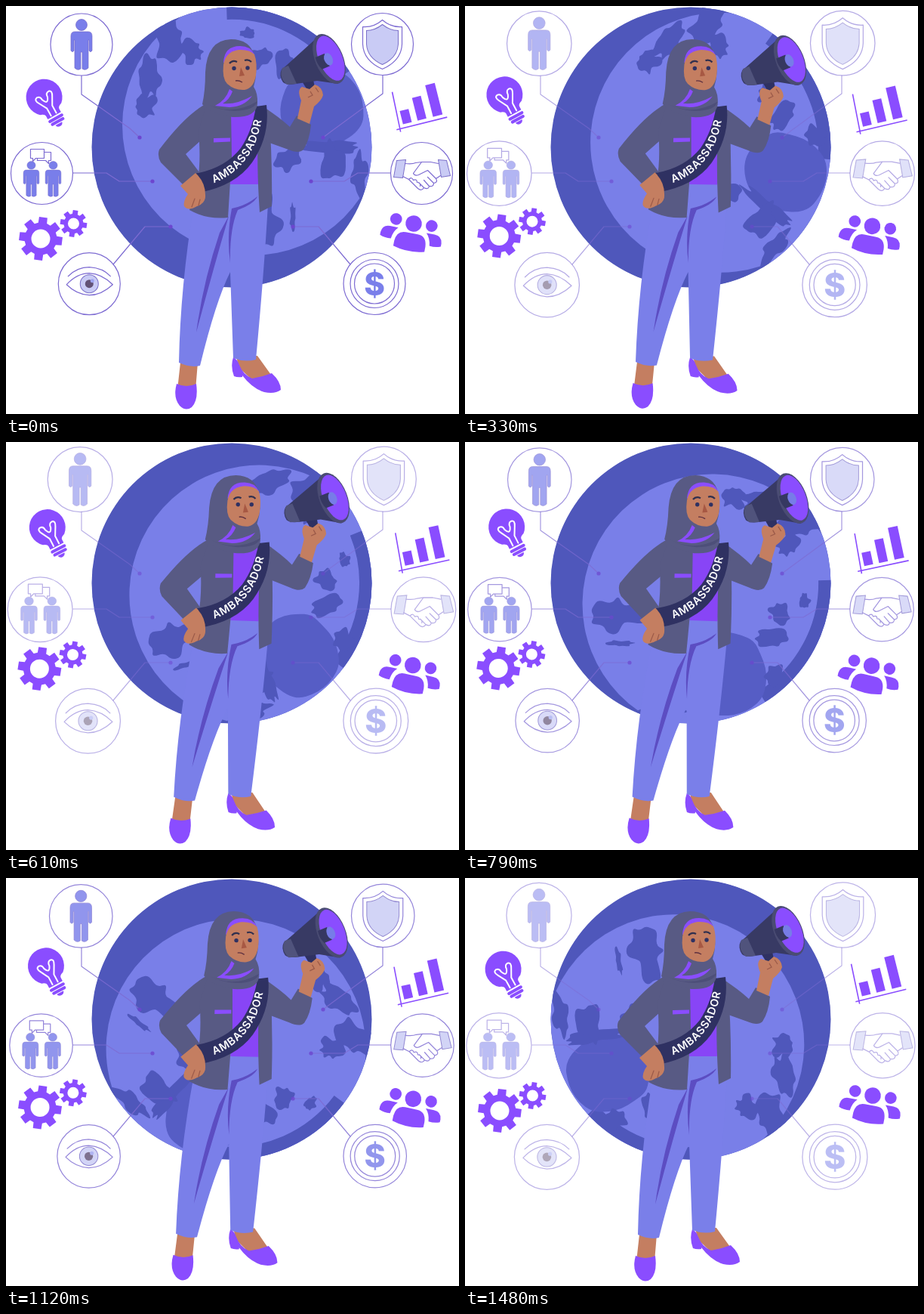
Recreate the animation shown at these times as an HTML page. Size 600x540 px, loop 1510 ms.

```html
<!DOCTYPE html>
<html lang="en">
<head>
<meta charset="utf-8">
<title>Ambassador</title>
<style>
html, body { margin: 0; width: 100%; height: 100%; overflow: hidden; background: #fff; }
svg { display: block; width: 600px; height: 540px; }
.v { fill: #8a4dff; }
.slate { fill: #585a84; }
.navy { fill: #2f3162; }
.skin { fill: #c47e61; }
.ln { fill: none; stroke: #7d6bd2; stroke-width: 1.2; stroke-linejoin: round; stroke-linecap: round; }
.w { fill: none; stroke: #fff; stroke-width: 2; stroke-linecap: round; stroke-linejoin: round; }
.fig { fill: #797eea; stroke: #7468cb; stroke-width: .7; }
.pale { fill: #c9cbf5; stroke: #7b70c9; stroke-width: 1; }
</style>
</head>
<body>
<svg viewBox="0 0 600 540" xmlns="http://www.w3.org/2000/svg">
<defs>
  <clipPath id="ball"><circle cx="299" cy="187" r="185.5"/></clipPath>
  <path id="arc" d="M275 234.500Q332 212 340 141"/>
  <g id="man">
    <circle cy="-26" r="7.500"/>
    <path d="M-9-17H9Q14-17 14-11V8Q12 11 10 8V-6H9V31Q5 35 1 32V10H-1V32Q-5 35-9 31V-6H-10V8Q-12 11-14 8V-11Q-14-17-9-17Z"/>
  </g>
  <g id="side">
    <circle cx="-24" cy="-1.500" r="7.800"/>
    <path d="M-41 23V19Q-40 9-30 9H-19Q-25 15-26 25Q-34 26-41 23Z"/>
  </g>
</defs>

<g clip-path="url(#ball)"><g id="globe"></g></g>
<g id="wires"></g>

<g id="badges">
  <g data-c="100 51">
    <use href="#man" class="fig"/>
  </g>
  <g data-c="498.500 50.500">
    <path class="ln" d="M0-32Q11-22 26-23V0Q25 22 0 33Q-25 22-26 0V-23Q-11-22 0-32Z"/>
    <path class="pale" d="M0-26Q10-18 21-18V0Q20 18 0 27Q-20 18-21 0V-18Q-10-18 0-26Z"/>
  </g>
  <g data-c="47.500 221.500">
    <use href="#man" class="fig" transform="translate(-14 7.500)scale(.74 .7)"/>
    <use href="#man" class="fig" transform="translate(15 7.500)scale(.74 .7)"/>
    <path class="ln" d="M-15-32H3V-20H-8L-12-16V-20H-15ZM3-28H12V-17H9V-13L5-17H-6V-20"/>
  </g>
  <g data-c="550.500 221.500">
    <path class="pale" d="M-33-17L-21-18L-25 6L-37 5ZM33-17L22-18L26 5L38 3Z"/>
    <path class="ln" d="M-22-13Q-12-12-8-14L0-15L12-15L22-13M-25 4L-17 8L-5 20Q0 24 3 19L-4 12M3 19Q9 22 10 17L3 9M10 17Q16 18 16 13L8 5M16 13Q22 12 19 7L8-4L-4 2Q-9 4-11 0L0-15M19 7L25 3M-17 8Q-13 4-11 9Q-6 7-6 12Q-1 12-2 17"/>
  </g>
  <g data-c="110.300 367.700">
    <path class="ln" d="M-30 1Q-16-14 0-14Q17-13 31 1Q16 15 0 15Q-17 14-30 1ZM-28-10Q-16-22 0-22Q18-21 28-10"/>
    <circle class="pale" r="12"/>
    <circle r="5.500" fill="#625276"/><circle cx="4" cy="-4" r="2.500" fill="#9ea4f0"/>
  </g>
  <g data-c="488 367.500">
    <circle class="ln" r="32"/><circle class="ln" r="26.500"/>
    <text y="15" text-anchor="middle" font-family="Inter, sans-serif" font-weight="800" font-size="42" fill="#7a7fea">$</text>
  </g>
</g>

<g id="sway">
  <g transform="translate(51 121.500)rotate(-29)">
    <path class="v" d="M-10 22Q-10 19-16 17A24 24 0 1 1 16 17Q10 19 10 22V27H-10Z"/>
    <path class="w" d="M-4 25V14L-10 3Q-14-4-9-5Q-4-5-4 1Q-2 6 0 6Q2 6 4 1Q4-5 9-5Q14-4 10 3L4 14V25"/>
    <path d="M-9 31H9M-8 36H8" stroke="#8a4dff" stroke-width="4" stroke-linecap="round"/>
    <path class="v" d="M-5 39H5Q4 43 0 43Q-4 43-5 39Z"/>
  </g>
  <path id="gears" class="v" fill-rule="evenodd"/>
  <g transform="translate(520 158)rotate(-14)">
    <path class="v" d="M6 0V-18H18V0ZM26 0V-31H38V0ZM47 0V-43H60V0Z"/>
    <path d="M2.500-45L.5 9M-4 5H65" fill="none" stroke="#8a4dff" stroke-width="1.600"/>
  </g>
  <g class="v" transform="translate(540 288)rotate(11)">
    <circle r="10.800"/>
    <path d="M-21 34V27Q-20 13-8 13H8Q20 13 21 27V34Q0 40-21 34Z"/>
    <use href="#side"/><use href="#side" transform="scale(-1 1)"/>
  </g>

  <!-- legs and shoes -->
  <path class="skin" d="M231 472H254L251 508H227ZM305 463H333L351 488L326 495L308 478Z"/>
  <path class="v" d="M226 500Q239 506 252 500Q255 522 246 531Q238 537 230 529Q221 518 226 500Z"/>
  <path class="v" d="M301 465Q306 467 309 475Q314 488 326 493Q339 491 352 486Q364 497 364 508Q356 514 342 511Q326 506 313 489V491Q307 492 302 490Q297 477 301 465Z"/>
  <path fill="#7a7fe9" d="M249 262Q231 370 229 472Q244 479 257 476Q278 390 297 352L301 466Q316 472 331 468Q342 350 347 262L335 234H280Z"/>
  <path fill="#5c4dc2" d="M295 278Q274 350 252 432Q261 365 283 300ZM299 268L307 266Q321 262 333 252Q329 262 307 270Q296 295 297 340Q292 305 299 268Z"/>

  <!-- torso -->
  <path fill="#8845f6" d="M294 138H338L334 236H297Z"/>
  <path class="slate" d="M268 128Q240 141 203 190Q200 198 205 207L236 238L256 220L238 196L258 178Z"/>
  <path class="slate" d="M266 128L255 165Q259 214 252 238L243 270Q266 283 294 280L299 200L298 140Z"/>
  <path class="slate" d="M326 130L348 138Q353 200 352 265L336 273Q331 200 335 150Z"/>
  <path class="slate" d="M340 133Q362 147 376 160L385 145L404 157Q402 178 394 190Q388 196 374 190L346 180Z"/>
  <path class="v" d="M275 175L297 174.500V179.500L275 180.500Z"/>
  <path class="navy" d="M331 133L345 131Q350 172 326 207Q304 238 256 247L250 222Q290 215 311 188Q326 166 331 133Z"/>
  <text font-family="Inter, sans-serif" font-weight="600" font-size="14.300" letter-spacing=".8" fill="#fff"><textPath href="#arc">AMBASSADOR</textPath></text>
  <path class="skin" d="M231 238L251 221Q264 233 264 250Q265 261 253 265Q241 272 236 265Q234 259 241 249Z"/>
  <path d="M246 266L250 255M255 264L257 256" class="ln" style="stroke:#9b5a49"/>

  <!-- head -->
  <path class="slate" d="M298 44Q266 45 264 88Q264 112 260 130Q270 143 300 147Q331 148 333 130Q334 116 328 107Q334 88 329 66Q323 44 298 44Z"/>
  <path class="v" d="M288 75Q289 53 310 53Q324 53 329 64L326 74H292Z"/>
  <path class="skin" d="M288 78Q290 61 308 58Q322 57 329 64Q333 75 331 92Q328 109 316 111Q303 112 293 103Q286 96 288 78Z"/>
  <path class="v" d="M277 132Q291 125 296 110L300 113Q296 124 287 129Q305 131 326 119Q316 133 296 134Z"/>
  <path fill="#4d4f79" d="M267 130Q300 146 333 126Q330 138 303 139Q282 138 267 130Z"/>
  <circle class="navy" cx="302" cy="82.500" r="2.700"/><circle class="navy" cx="320" cy="82" r="2.700"/>
  <path d="M296 76Q300 71 306 74M316 72Q321 70 325 74" fill="none" stroke="#30304f" stroke-width="2.200"/>
  <path fill="#a75843" d="M311 81L316 92L309 93Z"/>
  <path d="M304 99Q308 98 313 101" fill="none" stroke="#5f3140" stroke-width="1.400"/>

  <!-- megaphone -->
  <path class="navy" d="M391 98L406 93L410 112L402 116Z"/>
  <path class="skin" d="M386 149L391 125Q385 111 392 107L402 110L409 104Q419 107 420 118Q418 125 408 133L402 156Z"/>
  <path d="M403 113L406 118L400 121M410 108L414 114" fill="none" stroke="#9b5a49" stroke-width="1.300"/>
  <path fill="#383a64" d="M365 84Q361 92 367 101Q372 105 384 103L412 99L440 103L414 40L371 79Z"/>
  <path fill="#50537c" d="M366 82L374 79L385 103L372 104Q361 95 366 82Z"/>
  <g transform="translate(428 70)rotate(-23)">
    <ellipse rx="18.500" ry="35" fill="#4a4c73"/>
    <ellipse cx="2" rx="15.500" ry="31.500" fill="#8a4dff"/>
    <path fill="#363861" d="M-16-9H-3V9H-14Q-18 0-16-9Z"/>
    <ellipse cx="-1" rx="5.500" ry="8.500" fill="#777ce8"/>
  </g>
</g>
</svg>
<script>
const LOOP = 1510, PULSE = 1000, SPIN = 0.115; // ms, ms, degrees per ms
const TAU = Math.PI * 2, CX = 299, CY = 187, R = 186;
const DARK = '#4f57bb', MID = '#565dc5', LIGHT = '#797fe8';
const $ = id => document.getElementById(id);

let seed = 11;
const random = () => (seed = seed * 16807 % 2147483647) / 2147483647;

// Rounded outline around (x, y) with a ragged edge
function blob(x, y, rx, ry, rough = .5, fill = DARK) {
  const n = 18, pts = [];
  for (let i = 0; i < n; i++) {
    const a = i / n * TAU, k = 1 + rough * (random() - .5);
    pts.push([x + rx * k * Math.cos(a), y + ry * k * Math.sin(a)]);
  }
  const mid = i => pts[i].map((v, j) => (v + pts[(i + 1) % n][j]) / 2);
  let d = 'M' + mid(n - 1);
  for (let i = 0; i < n; i++) d += `Q${pts[i]} ${mid(i)}`;
  return `<path d="${d}Z" fill="${fill}"/>`;
}

const disc = (x, y, r, fill) => `<circle cx="${x}" cy="${y}" r="${r}" fill="${fill}"/>`;

// The sea is a disc set off from the centre; the lands lie on it
$('globe').innerHTML = disc(CX, CY, R, DARK) + disc(CX + 27, CY - 29, 172, LIGHT) +
  `<path d="M292 9A178 178 0 0 1 448 90" fill="none" stroke="${DARK}" stroke-width="18"/>` +
  blob(419, 136, 58, 52, .12, MID) +
  [
    [215, 45, 19, 32], [246, 60, 13, 15], [190, 95, 13, 25], [184, 134, 15, 15],
    [320, 36, 9, 7], [337, 67, 13, 15], [368, 77, 13, 22], [419, 74, 15, 13],
    [430, 186, 46, 8], [432, 206, 14, 25], [468, 222, 10, 28],
    [372, 203, 16, 15], [342, 283, 20, 32], [380, 281, 4, 18]
  ].map(b => blob(...b, .8)).join('');

function gear(cx, cy, out, body, hole, phase) {
  const pts = [];
  for (let i = 0; i < 8; i++) {
    [[-.27, body], [-.19, out], [.19, out], [.27, body]].forEach(([da, r]) => {
      const a = phase + i * TAU / 8 + da;
      pts.push([cx + r * Math.cos(a), cy + r * Math.sin(a)]);
    });
  }
  const half = s => `a${hole} ${hole} 0 1 0 ${2 * hole * s} 0`;
  return `M${pts.join('L')}ZM${cx - hole} ${cy}${half(1)}${half(-1)}Z`;
}
$('gears').setAttribute('d', gear(46, 308, 29, 21.5, 12.5, .12) + gear(89.5, 288, 18, 13, 7.5, .15));

// Each wire ends in a dot
$('wires').innerHTML = [
  ['M100 92V117L164 162L', 177, 174],
  ['M89 221H133L150 232L', 194, 232],
  ['M142 342L184 292L', 218, 292],
  ['M499 92V116L432 165L', 420, 174],
  ['M510 221H466L448 232L', 404, 232],
  ['M456 342L414 292L', 380, 292]
].map(([d, x, y]) => `<path class="ln" d="${d}${x} ${y}"/>` + disc(x, y, 2.6, '#6c46cf')).join('');

const badges = [...$('badges').children].map(g => {
  const [x, y] = g.dataset.c.split(' ').map(Number);
  g.innerHTML = `<circle r="41" fill="#fff"/><g>${g.innerHTML}<circle class="ln" r="41"/></g>`;
  return { g, x, y, ink: g.lastChild };
});

function draw(t) {
  $('globe').setAttribute('transform', `rotate(${SPIN * t} ${CX} ${CY})`);

  const fade = Math.abs(Math.sin(Math.PI * t / PULSE));
  const push = .01 * fade;
  for (const { g, x, y, ink } of badges) {
    g.setAttribute('transform', `translate(${x + (x - 298) * push} ${y + (y - 200) * push})scale(${1 + .05 * fade})`);
    ink.setAttribute('opacity', 1 - .5 * fade);
  }
  $('wires').setAttribute('opacity', 1 - .5 * fade);

  const lean = 1.95 * (1 - Math.cos(TAU * t / LOOP)) / 2;
  $('sway').setAttribute('transform', `rotate(${lean} 298 252)`);
}

const start = performance.now();
function tick() {
  draw((performance.now() - start) % LOOP);
  requestAnimationFrame(tick);
}
draw(0);
requestAnimationFrame(tick);
</script>
</body>
</html>
```
